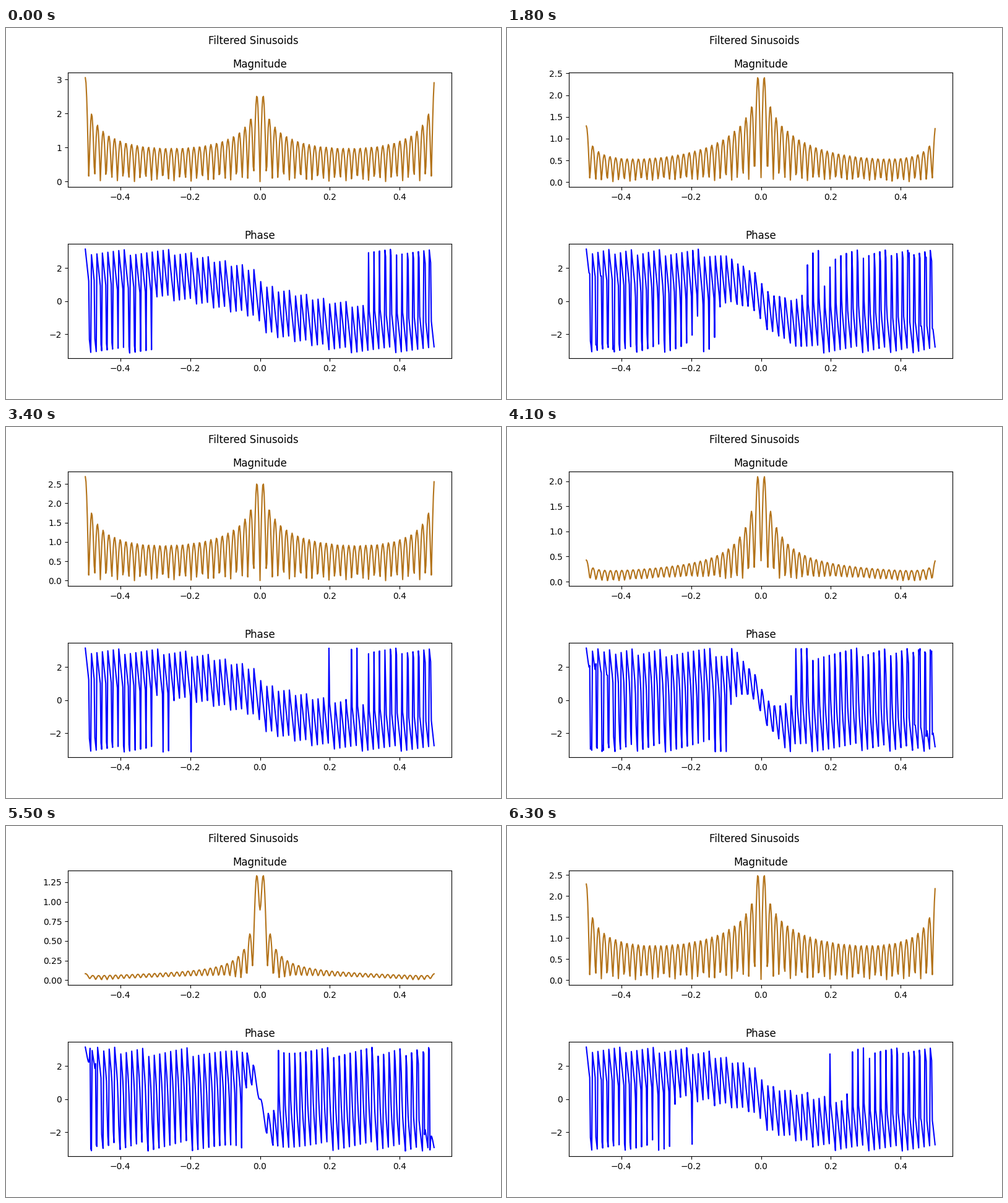
A matplotlib script that plays this animation: 800 by 600 pixels, repeating every 6400 ms.

```python
import matplotlib.pyplot as plt
import numpy as np
from matplotlib.animation import FuncAnimation

STEPS = 64
FFT_SIZE = 512
TONES = 32

# Average of harmonics 0..31 over one period, endpoint included
t = np.linspace(0, 1, STEPS)
signal = np.mean([np.sin(2 * np.pi * k * t) for k in range(TONES)], axis=0)

freqs = np.fft.fftshift(np.fft.fftfreq(FFT_SIZE))
poles = np.linspace(0.01, 0.99, STEPS)
# The steps play in alphabetical order: 0, 1, 10, 11, ...
order = sorted(range(STEPS), key=str)


def smooth(x, a):
    """One-pole low-pass filter, starting from rest."""
    out = np.zeros_like(x)
    last = 0.0
    for i, value in enumerate(x):
        last = (1 - a) * value + a * last
        out[i] = last
    return out


def spectrum(a):
    spec = np.fft.fftshift(np.fft.fft(smooth(signal, a), FFT_SIZE))
    phase = np.angle(spec)
    phase[0] = abs(phase[0])  # the Nyquist bin is real: keep +pi
    return np.abs(spec), phase


fig, axes = plt.subplots(2, 1, figsize=(8, 6), dpi=100)
fig.subplots_adjust(left=0.125, right=0.9, bottom=0.11, top=0.88, hspace=0.5)
fig.suptitle("Filtered Sinusoids")

lines = []
for ax, title, color in zip(axes, ("Magnitude", "Phase"),
                            ((0.7, 0.45, 0.1), "blue")):
    ax.set_title(title)
    lines.extend(ax.plot(freqs, np.zeros(FFT_SIZE), color=color))


def update(frame):
    for ax, line, values in zip(axes, lines, spectrum(poles[order[frame]])):
        line.set_ydata(values)
        ax.relim()
        ax.autoscale_view()
    return lines


anim = FuncAnimation(fig, update, frames=STEPS, interval=100,
                     repeat=True, repeat_delay=0, blit=False)
plt.show()
```
